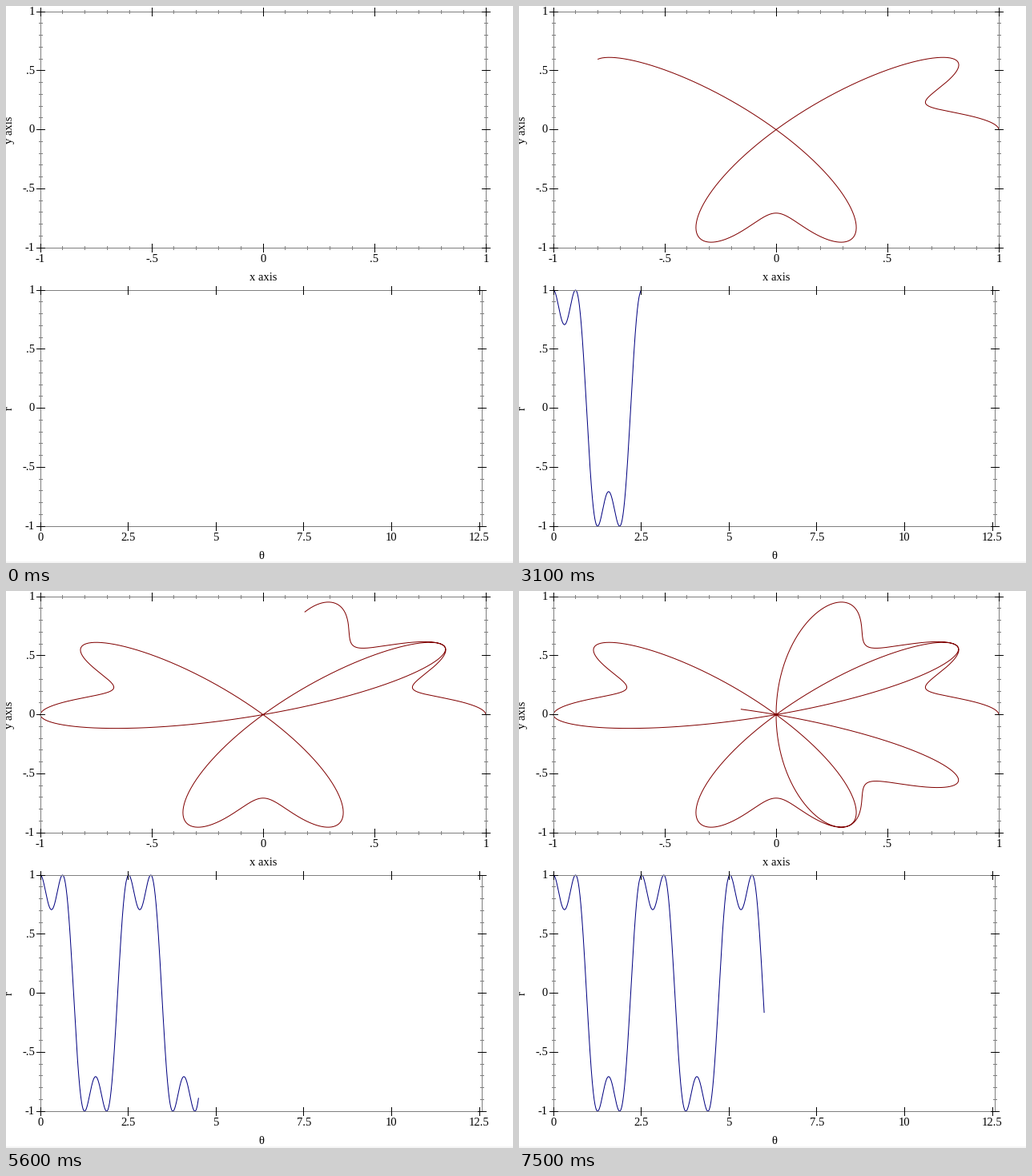
Recreate the animation shown at these times as a matplotlib script. Size 633 by 696 pixels, loop 8000 ms.

```python
import numpy as np
import matplotlib.pyplot as plt
from matplotlib.animation import FuncAnimation

W, H, DPI = 633, 696, 72  # at 72 dpi one point is one pixel
STEP_MS, FRAMES = 100, 80
FONT = dict(family="Liberation Serif", fontsize=14.67, color="black")
GREY = "#7f7f7f"

# Frames at which each plot extends its curve by another half radian.
POLAR_STEPS = [4, 10, 16, 22, 29, 36, 42, 49, 55, 61, 68, 74]
RADIUS_STEPS = [5, 11, 17, 23, 31, 37, 43, 50, 56, 63, 69, 75]

fig = plt.figure(figsize=(W / DPI, H / DPI), dpi=DPI, facecolor="white")
ax = fig.add_axes([0, 0, 1, 1])
ax.set_xlim(0, W)
ax.set_ylim(H, 0)
ax.axis("off")


def radius(theta):
    return np.cos(2.5 * theta) ** 3 + np.sin(2.5 * theta) ** 3


def label(value):
    return f"{value:g}".replace("0.", ".")


def segment(xs, ys, color):
    """Line through pixel centres, given whole pixel coordinates."""
    ax.plot(np.add(xs, 0.5), np.add(ys, 0.5), color=color, lw=1, snap=False,
            solid_capstyle="butt", solid_joinstyle="miter", zorder=3)


class Panel:
    def __init__(self, box, x_range, major_x, minor_x, x_name, y_name, color):
        self.left, self.top, self.right, self.bottom = box
        self.x_min, self.x_max = x_range
        segment([self.left, self.right, self.right, self.left, self.left],
                [self.top, self.top, self.bottom, self.bottom, self.top], GREY)
        for value in minor_x:
            self.x_tick(value, 2.5, GREY)
        for value in np.arange(-9, 10) / 10:
            self.y_tick(value, 2.5, GREY)
        for value in major_x:
            self.x_tick(value, 5.5, "black")
            ax.text(self.px(value), self.bottom + 18, label(value),
                    ha="center", va="baseline", **FONT)
        for value in np.arange(-2, 3) / 2:
            self.y_tick(value, 5.5, "black")
            ax.text(36, self.py(value) + 3.9, label(value),
                    ha="right", va="baseline", **FONT)
        mid_x = (self.left + self.right) / 2
        mid_y = (self.top + self.bottom) / 2
        ax.text(mid_x, self.bottom + 41, x_name, ha="center", va="baseline", **FONT)
        ax.text(8, mid_y, y_name, rotation=90, rotation_mode="anchor",
                ha="center", va="baseline", **FONT)
        self.curve, = ax.plot([], [], color=color, lw=1, zorder=2)

    def px(self, x):
        span = self.right - self.left
        return self.left + (x - self.x_min) / (self.x_max - self.x_min) * span

    def py(self, y):
        return self.bottom - (y + 1) / 2 * (self.bottom - self.top)

    def x_tick(self, value, size, color):
        x = np.floor(self.px(value) + 1e-6)
        for y in (self.top, self.bottom):
            segment([x, x], [y - size, y + size], color)

    def y_tick(self, value, size, color):
        y = np.floor(self.py(value) + 1e-6)
        for x in (self.left, self.right):
            segment([x - size, x + size], [y, y], color)

    def draw(self, x, y):
        self.curve.set_data(self.px(x), self.py(y))


polar = Panel((43, 7, 599, 302), (-1, 1), np.arange(-2, 3) / 2,
              np.arange(-9, 10) / 10, "x axis", "y axis", "#800000")
wave = Panel((43, 355, 594, 650), (0, 4 * np.pi), np.arange(0, 13, 2.5),
             [], "θ", "r", "#000080")
ax.add_patch(plt.Rectangle((0, 694), W, 2, color="#f5f5f5", lw=0))


def sweep(frame, steps):
    """Angles drawn so far; empty before the first step."""
    count = sum(frame >= s for s in steps)
    return np.linspace(0, count / 2, 100 * count)


def update(frame):
    theta = sweep(frame, POLAR_STEPS)
    r = radius(theta)
    polar.draw(r * np.cos(theta), r * np.sin(theta))
    theta = sweep(frame, RADIUS_STEPS)
    wave.draw(theta, radius(theta))
    return polar.curve, wave.curve


anim = FuncAnimation(fig, update, frames=FRAMES, interval=STEP_MS,
                     repeat=True, repeat_delay=0, blit=False)
plt.show()
```
